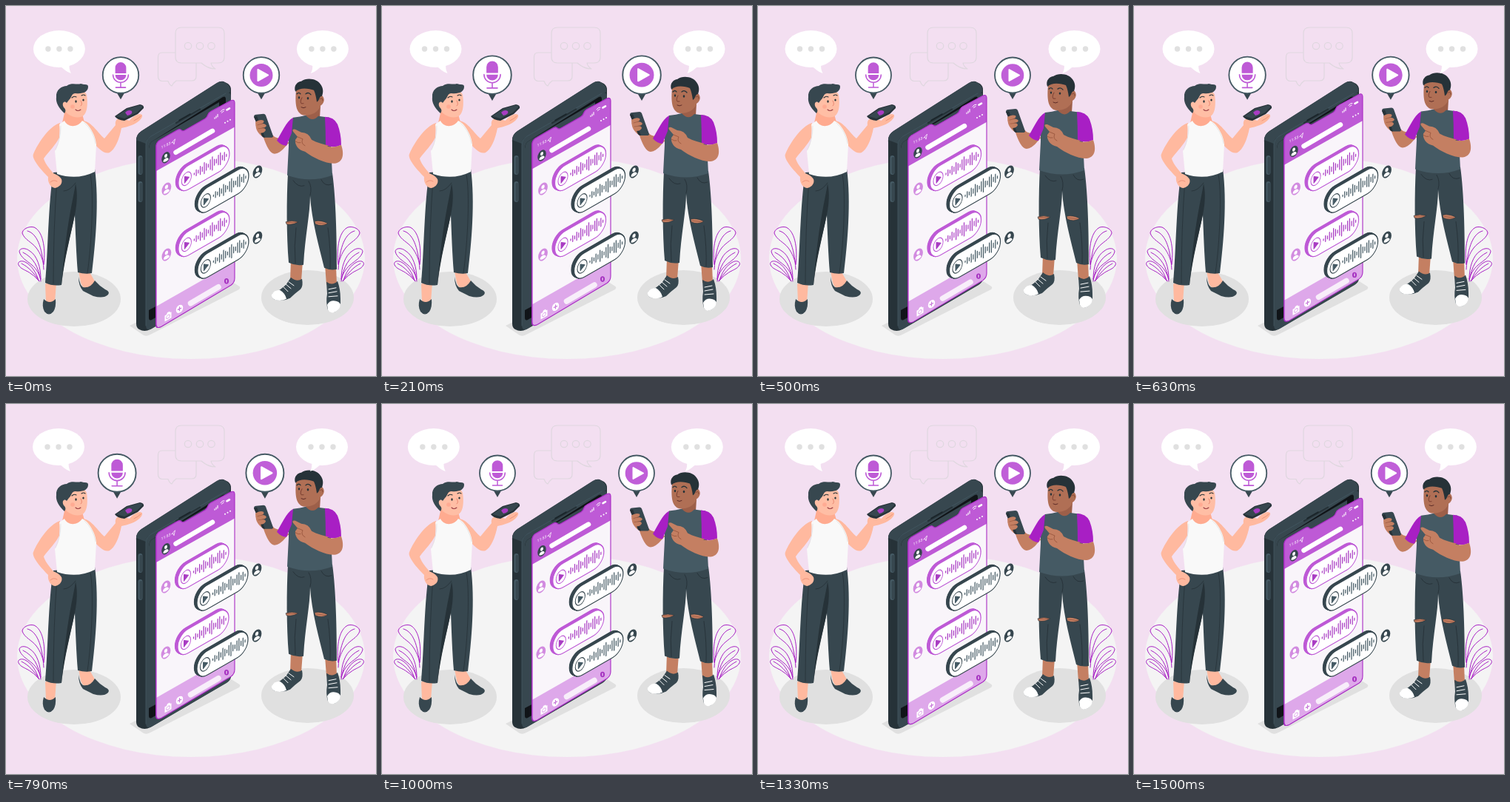
Write an HTML page that moves like this. It is 500 by 500 pixels and loops after 1.54 s.

```html
<!DOCTYPE html>
<html lang="en">
<head>
<meta charset="utf-8">
<title>Voice chat</title>
<style>
html,body{margin:0;width:100%;height:100%;overflow:hidden;background:#f3dff1}
svg{display:block;width:100vw;height:100vh}
.ln{fill:none;stroke-linecap:round;stroke-linejoin:round}
</style>
</head>
<body>
<svg viewBox="0 0 500 500" xmlns="http://www.w3.org/2000/svg">
<defs>
  <g id="plant" class="ln" stroke="#a81fc4" stroke-width="1">
    <path d="M51 349C54 325 49 304 38 299C30 297 22 302 22 307C25 316 35 319 41 327C47 335 49 342 51 349"/>
    <path d="M29 304C41 307 49 324 51 356"/>
    <path d="M47 369C47 353 42 337 32 331C26 326 18 327 18 332C20 340 28 344 35 350C42 356 45 363 47 369"/>
    <path d="M23 333C37 340 44 352 47 372"/>
    <path d="M44 371C41 360 34 350 26 346C20 343 15 346 17 350C20 356 28 357 34 362C39 365 42 369 44 371"/>
    <path d="M21 348C31 353 38 361 45 372"/>
  </g>
  <g id="talk">
    <ellipse cx="72" cy="58" rx="35" ry="25" fill="#fff"/>
    <path d="M72 81C78 84 81 89 88 91C86 87 85 83 86 78Z" fill="#fff"/>
  </g>
  <g id="dots" fill="#e0e0e0"><circle cx="57" cy="58" r="3.7"/><circle cx="72" cy="58" r="3.7"/><circle cx="87" cy="58" r="3.7"/></g>
  <g id="pin">
    <path d="M-6 22H6L0 32.500Z" fill="#37474f"/>
    <circle r="24" fill="#fff" stroke="#455a64" stroke-width="1.800"/>
  </g>
  <g id="face"><ellipse rx="6.400" ry="8"/><ellipse cy="-2.600" rx="2.200" ry="2.700" fill="#fff"/><path d="M-4 4.600C-4 -.2 4 -.2 4 4.600C2 6.600 -2 6.600 -4 4.600Z" fill="#fff"/></g>
  <clipPath id="panelClip"><use href="#panelShape"/></clipPath>
  <path id="panelShape" d="M203 190Q203 185 207 182L232 167.500Q235 166 237 168Q239 170 242 168L269 152.500Q272 150.500 273 147Q274 144 277 142.500L304 128Q309 126 309 131V368Q309 374 304 377.500L210 433.500Q203 437 203 430Z"/>
</defs>

<rect width="500" height="500" fill="#f3dff1"/>
<ellipse cx="250" cy="341" rx="235" ry="136" fill="#f4f4f4"/>
<ellipse cx="92" cy="396" rx="63" ry="37" fill="#e0e0e0"/>
<ellipse cx="407.500" cy="394" rx="62.500" ry="37" fill="#e0e0e0"/>
<path d="M167 432L186 445Q190 447 195 444L315 383Q318 380 314 378L298 368Z" fill="#e0e0e0"/>

<g class="ln" stroke="#dfd7df" stroke-width="1.200">
  <path d="M211 63H251Q257 63 257 69V95Q257 101 251 101H230Q226 104 224 108Q221 107 219 101.500H211Q205.500 101 205.500 95V69Q205.500 63 211 63Z"/>
  <path fill="#f3dff1" d="M237 29H287Q295 29 295 37V69Q295 77 287 77H277Q278 82 283 85Q273 85 264 77H237Q229 77 229 69V37Q229 29 237 29Z"/>
  <circle cx="246" cy="54" r="4.700"/><circle cx="262" cy="54" r="4.700"/><circle cx="277.500" cy="54" r="4.700"/>
</g>

<use href="#plant"/>
<use href="#plant" transform="matrix(-1 0 0 1 500 0)"/>

<!-- phone -->
<path d="M176 184Q175 174 183 169L285 104Q290 101 294 102L300 105Q304 108 304 113V367Q304 373 299 376L195 437Q187 441 180 437Q176 435 176 429Z" fill="#263238"/>
<path d="M189 188Q189 180 196 176L295 119Q304 114 304 123V367Q304 373 298 377L197 436Q189 440 189 431Z" fill="#37474f"/>
<path d="M176 181Q176 174 183 169L285 104Q291 100 297 104Q304 108 303 116L194 177Q189 180 189 186Z" fill="#37474f"/>
<path d="M189 432V188Q189 180 196 176L297 118" class="ln" stroke="#455a64" stroke-width=".800"/>
<path d="M193 193Q193 185 199 182L293 123Q297 121 297 126V366L197 424Q193 426 193 421Z" fill="#101418"/>
<path d="M193 193Q193 185 199 182L288 130V360L193 411Z" fill="#37474f"/>
<path d="M230 158L262 139.500" class="ln" stroke="#263238" stroke-width="2.400"/>
<path d="M234 154.500L249 146" class="ln" stroke="#1a2429" stroke-width="1.500"/>
<g class="ln" stroke="#455a64" stroke-width="6"><path d="M181.500 205V225M181.500 240V262"/></g>
<g class="ln" stroke="#37474f" stroke-width="4"><path d="M182.500 206V225M182.500 241V262"/></g>

<!-- left man -->
<path d="M80 140L76 158Q90 172 106 157L103 146Z" fill="#ffab90"/>
<path d="M104 155C117 157 124 172 133 179L148 161C147 155 150 151 157 152L167 155C173 149 179 145 184 147C185 152 178 158 170 161C165 163 160 164 156 165C153 181 147 194 140 198C132 201 124 191 117 184Z" fill="#ffb99f"/>
<path d="M55 374L53 376L54 400H66L68 374ZM98 358L101 374Q104 383 112 382L120 372L112 358Z" fill="#ffb99f"/>
<path d="M51 396Q59 404 67 396Q68 407 64 413Q58 420 52 413Q48 406 51 396ZM98 366Q100 378 104 380Q114 382 120 371Q126 378 134 383Q141 386 138 390Q132 396 118 392L104 385Q98 378 98 366Z" fill="#37474f"/>
<path d="M64 225C57 266 57 330 53 374Q63 379 75 377C78 340 88 308 93 282C94 308 95 336 97 360Q107 363 116 361C121 320 126 265 120 220Z" fill="#37474f"/>
<path d="M93 282C96 268 97 252 94 240C91 262 82 290 75 377C79 340 88 308 93 282Z" fill="#263238"/>
<g class="ln" stroke="#263238" stroke-width=".800"><path d="M94 239Q86 250 78 250M69 234Q64 300 64 375M114 228C119 250 116 320 110 361"/></g>
<path d="M73 158C58 163 44 184 37 200C34 206 47 221 57 231C56 238 60 245 66 246C72 245 77 240 75 234C72 229 66 227 64 226C57 218 52 211 51 206C59 195 67 188 72 178Z" fill="#ffb99f"/>
<path d="M72 160L79 155C83 164 96 165 103 155C112 159 121 174 122 187L120 224Q96 236 69 227L66 196C73 186 74 170 72 160Z" fill="#f9f9f9"/>
<path d="M74 162Q74 180 67 194M106 158Q118 168 121 186" class="ln" stroke="#dedede" stroke-width=".700"/>
<path d="M79 120C84 110 106 110 109 120C111 133 110 148 101 150C91 152 80 146 78 138C72 134 76 126 80 130Z" fill="#ffbea5"/>
<path d="M79 145C71 138 67 130 68 123C67 113 76 108 82 108C89 103 96 107 101 105C107 107 111 105 111 109C111 116 104 119 94 118C88 118 89 124 85 127L82 131C78 127 75 132 78 137C81 140 81 142 79 145Z" fill="#37474f"/>
<g class="ln" stroke="#263238" stroke-width="1.100"><path d="M89 124Q92 121 95 123M102 121Q105 119 107 121"/><path d="M101 128Q104 133 101 135" stroke="#e57f68" stroke-width=".900"/><path d="M94 140Q97 143 101 140" stroke="#9b3f45"/></g>
<ellipse cx="94.500" cy="129" rx="1.200" ry="1.700" fill="#263238"/><ellipse cx="104.500" cy="127" rx="1.200" ry="1.600" fill="#263238"/>
<circle cx="90" cy="136" r="2.800" fill="#ffab93"/>
<path d="M147 149L163 138L181 133Q187 134 186 138L178 146L160 155Q150 154 147 149Z" fill="#263238"/>
<path d="M149 149L164 139L181 134L185 136L177 144L160 152Z" fill="#37474f"/>
<path d="M161 144Q165 139 170 142Q172 146 164 148Z" fill="#a93cc3"/>
<path d="M167 155Q172 148 180 146Q184 146 184 149L172 160Z" fill="#ffb99f"/>
<path d="M173 155Q179 152 182 149M60 238Q64 234 69 237" class="ln" stroke="#e88a73" stroke-width=".800"/>

<!-- floating panel and right man -->
<g id="float">
  <use href="#panelShape" fill="#9c2bb5" x="-1" y=".6"/>
  <g clip-path="url(#panelClip)">
    <rect x="200" y="120" width="112" height="320" fill="#f9f5fa"/>
    <path d="M200 120H312V162L200 225Z" fill="#be5ad6"/>
    <path d="M200 408L312 344V440H200Z" fill="#dea8ea"/>
  </g>
  <use href="#panelShape" class="ln" stroke="#a92ac4" stroke-width="1.100"/>
  <g class="ln" stroke="#fff">
    <path d="M229.500 198L279 169" stroke-width="6.500"/>
    <path d="M249.500 402L287 380" stroke-width="7.500" stroke="#f8eefa"/>
    <path d="M282 152.500V151M284 151.500V149M286 150V146.500" stroke-width="1.100"/>
    <path d="M290 143Q292.500 139 295 140M291.500 144.500Q292.500 142.500 294 142.500" stroke-width="1"/>
    <path d="M298.500 140.500L302 138.500" stroke-width="2.600"/>
    <path d="M296 158V158M299.500 156V156M303 154V154" stroke-width="2"/>
    <path d="M224 185L228.500 180L227 187L226 184.500Z" stroke-width=".700"/>
  </g>
  <text transform="matrix(1 -.5 0 1 209.500 193.500)" font-family="Roboto,sans-serif" font-size="5.200" fill="#fff">11:53</text>
  <use href="#face" transform="matrix(.9 -.4 0 .9 216 205)" fill="#37474f"/>
  <g transform="matrix(1 -.577 0 1 219 419)"><path d="M-4.500 -3H-2L-1 -5H2L3 -3H4.500V5H-4.500Z" fill="#fff"/><circle cy="1" r="2.300" fill="#fff" stroke="#dea8ea"/></g>
  <g transform="matrix(.9 -.4 0 1 234.500 409.500)"><circle r="5.200" fill="#fff"/><path d="M-3 0H3M0 -3V3" stroke="#c779d9" stroke-width="1.300"/></g>
  <ellipse cx="298" cy="372" rx="3" ry="3.700" fill="#a52fc0"/><path d="M298 370V374" stroke="#fff"/>

  <path d="M385 343L384 372H399L401 345ZM431 350L433 377H447L446 352Z" fill="#c47f62"/>
  <path d="M385 367Q393 374 400 369Q402 379 398 383Q390 389 384 395Q374 400 363 397Q358 395 360 389Q373 383 379 376Z" fill="#37474f"/>
  <path d="M359 390Q363 384 370 384Q377 388 379 396Q371 400 363 397Q358 395 359 390Z" fill="#fff"/>
  <path d="M433 373Q441 379 448 372Q452 383 452 396Q453 407 447 412Q441 417 435 411Q432 401 434 389Z" fill="#37474f"/>
  <path d="M434 404Q438 397 446 399Q451 400 452 404Q451 410 446 413Q439 417 435 411Z" fill="#fff"/>
  <path d="M375 380L381 386M378 376L385 382M382 373L389 378M436 383L446 381M436 388L447 386M436 393L448 392" class="ln" stroke="#fff" stroke-width="1"/>
  <path d="M381 226C379 262 379 310 382 347Q392 352 402 350C404 312 411 280 411 257C413 290 423 325 430 354Q438 358 447 356C447 315 446 262 441 226Z" fill="#37474f"/>
  <g class="ln" stroke="#263238" stroke-width=".900"><path d="M411 256Q414 245 409 237M388 236Q395 246 403 243M426 235Q431 245 440 241M392 300Q389 325 391 348M435 300Q439 330 438 355"/></g>
  <path d="M378 292Q386 289 395 292Q387 297 379 295ZM417 291Q426 289 435 294Q427 299 418 295Z" fill="#c47f62" stroke="#263238" stroke-width=".600"/>
  <path d="M379 292.500L393 292.700M419 293L433 295" stroke="#8a4a38" stroke-width=".600"/>

  <path d="M369 179C360 178 357 171 355 163C351 155 341 153 338 159C336 167 342 174 348 178C352 190 357 200 363 200C373 199 377 189 383 185Z" fill="#c47f62"/>
  <path d="M408 140L404 151Q414 160 424 151L425 135Z" fill="#9d5f49"/>
  <path d="M388 151Q398 150 405 148Q414 158 422 149L437 151Q443 168 439 190L441 229Q411 240 380 229L382 190Q381 168 388 151Z" fill="#455a64"/>
  <path d="M388 151C378 157 373 171 366 182Q372 189 379 189L386 172Z" fill="#a81fc4"/>
  <path d="M431 150Q443 150 448 160Q453 173 453 188Q442 193 432 188Q432 170 431 150Z" fill="#a81fc4"/>
  <path d="M434 190Q444 192 453 188C458 203 454 212 444 213C430 213 415 205 404 197C395 195 390 188 391 181L394 177L388 170Q386 166 391 167L399 171Q409 171 413 181C420 185 429 187 436 189Z" fill="#c47f62"/>
  <path d="M394 177L401 180Q398 186 404 189M391 183Q395 186 398 185" class="ln" stroke="#9a573f" stroke-width=".900"/>
  <path d="M335 150Q335 147 338 147L348 146Q350 146 351 148L361 176Q361 178 358 178L350 178Q347 178 346 176Z" fill="#37474f"/>
  <path d="M335 150L346 176Q347 178 350 178L339 149Z" fill="#263238"/>
  <path d="M337 157Q343 153 348 155Q350 158 344 160Q350 158 352 162Q351 165 345 165Q351 165 351 168Q349 172 344 172Q337 167 337 157Z" fill="#c47f62"/>
  <path d="M340 161L347 159M341 166L349 165" class="ln" stroke="#9a573f" stroke-width=".700"/>
  <path d="M392 114Q395 107 410 108L424 120C431 121 432 131 425 135C422 144 413 148 404 148C393 147 390 136 392 114Z" fill="#b06f55"/>
  <path d="M391 116C388 107 395 102 399 102C407 96 421 99 425 106C429 111 429 117 427 122C423 122 424 128 420 130C419 123 418 118 416 114C410 112 398 109 391 116Z" fill="#263238"/>
  <path d="M424 126Q428 123 428 128" class="ln" stroke="#7b3f32" stroke-width=".800"/>
  <g class="ln" stroke="#263238" stroke-width="1.300"><path d="M393 119Q396 116 398 119M405 119Q409 116 412 120"/><path d="M400 124Q397 129 399 132L402 132" stroke="#7b3f32" stroke-width="1"/><path d="M399 137Q402 139 405 137" stroke="#5e2c28" stroke-width="1"/></g>
  <ellipse cx="396" cy="124" rx="1.200" ry="1.700" fill="#263238"/><ellipse cx="408" cy="125" rx="1.300" ry="1.700" fill="#263238"/>
</g>

<g id="beat">
  <use href="#pin" x="156" y="93.500"/>
  <path d="M148.700 91V83.500A7.300 7.300 0 0 1 163.300 83.500V91ZM148.700 93H163.300A7.300 7.300 0 0 1 148.700 93Z" fill="#be5ad6"/>
  <path d="M145.700 93A10.300 10.300 0 0 0 166.300 93M156 103.500V109.500M149.500 110H162.500" class="ln" stroke="#be5ad6" stroke-width="1.500"/>
  <use href="#pin" x="344" y="93.500"/>
  <circle cx="344" cy="93.500" r="15.300" fill="#c05fd8"/>
  <path d="M339.500 86V101L353 93.500Z" fill="#fff" stroke="#fff" stroke-width="2" stroke-linejoin="round"/>
</g>

<g id="shake">
  <use href="#talk"/><use href="#dots"/>
  <use href="#talk" transform="matrix(-1 0 0 1 500 0)"/><use href="#dots" x="356"/>
  <g id="chat"></g>
</g>
</svg>
<script>
const $ = id => document.getElementById(id);
const bars = [2, 8, 4, 11, 6, 15, 9, 4, 13, 18, 8, 5, 13, 16, 6, 11, 3];

function voice(x, y, color, dark) {
  const pill = (dx, dy, fill) =>
    `<rect x="${dx}" y="${dy}" width="69" height="32.5" rx="14" ry="16.2" fill="${fill}" stroke="${color}" stroke-width="1.2"/>`;
  let side = '';
  for (let i = 7; i > 0; i--) side += pill(-i / 2, -i * .53, color);
  const wave = bars.map((h, i) => `M${21.5 + i * 2.72} ${16 - h / 2}v${h}`).join('');
  return `<g transform="matrix(1 -.577 0 1 ${x} ${y})">${side}${pill(0, 0, '#fff')}
    <ellipse cx="11" cy="16.5" rx="6.6" ry="8.4" fill="#fff" stroke="${color}" stroke-width="1"/>
    <path d="M8.5 12.2V20.8L14.5 16.5Z" fill="${dark}" stroke="${dark}" stroke-linejoin="round"/>
    <path d="${wave}" class="ln" stroke="${dark}" stroke-width="1.25"/></g>`;
}

const avatar = (x, y, color) =>
  `<use href="#face" transform="matrix(1 -.45 0 1 ${x} ${y})" fill="${color}"/>`;

$('chat').innerHTML = [0, 89].map(dy =>
  voice(233, 223.3 + dy, '#be5ad6', '#a93cc3') + avatar(217, 247 + dy, '#d28be0') +
  voice(259, 252.8 + dy, '#37474f', '#455a64') + avatar(340, 224 + dy, '#37474f')).join('');

const sway = [0, -1, 2, -4, 4, -4, 4, -4, 2, -1, 0].map((v, i) => [i / 10, v]);
const pulse = [[0, 1], [.1, 1.1], [.3, 1], [.4, 1], [.5, 1.1], [.6, 1], [1, 1]];
const lift = [[0, 0], [.5, -10], [1, 0]];

function at(keys, p) {
  const i = keys.findIndex(k => k[0] > p);
  const [a, u] = keys[i - 1], [b, v] = keys[i];
  return u + (v - u) * (p - a) / (b - a);
}

function draw(ms) {
  const p = (ms % 1540 + 15) / 1500 % 1;
  $('float').setAttribute('transform', `translate(0 ${at(lift, p)})`);
  $('shake').setAttribute('transform', `translate(${at(sway, p)} 0)`);
  $('beat').setAttribute('transform', `translate(250 98) scale(${at(pulse, p)}) translate(-250 -98)`);
}

const start = performance.now();
function tick() {
  draw(performance.now() - start);
  requestAnimationFrame(tick);
}
tick();
</script>
</body>
</html>
```
